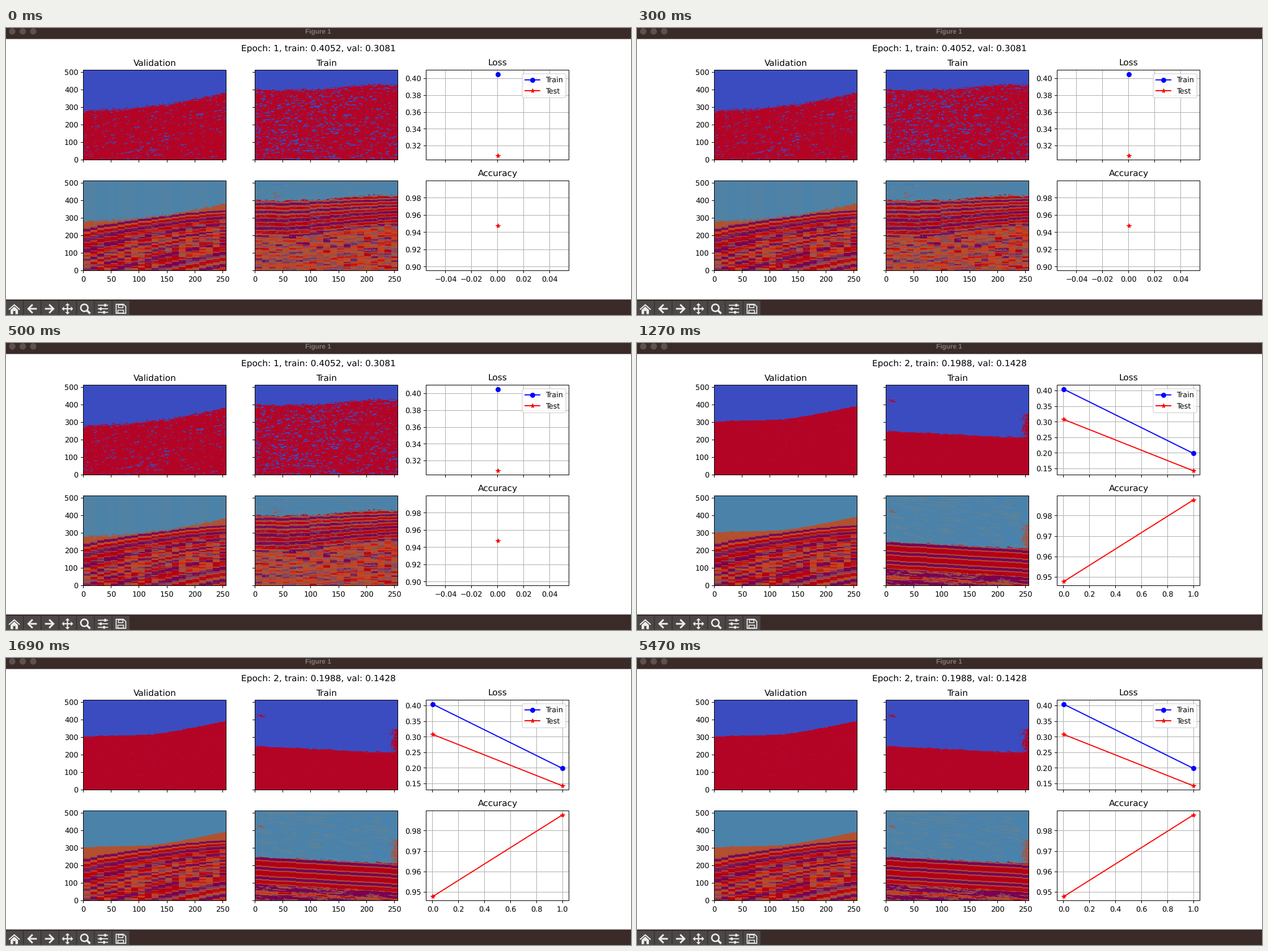
A matplotlib script for the animation above (7.99 s loop, 1103 by 508 pixels).

```python
import numpy as np
import matplotlib.pyplot as plt
from matplotlib.animation import FuncAnimation
from matplotlib.collections import LineCollection
from matplotlib.colors import LinearSegmentedColormap
from matplotlib.patches import Circle, FancyBboxPatch, Polygon, Rectangle

plt.rcParams["text.hinting"] = "none"
plt.rcParams["font.family"] = "DejaVu Sans"
plt.rcParams["path.snap"] = False

STAGE_W, STAGE_H, DPI = 1103, 508, 64
PT = 72 / DPI                      # points per pixel
STEP, FRAMES, SWITCH = 34, 235, 640
W, H = 252, 159                    # size of each panel
COLS, ROWS = (136.5, 439.5, 741.5), (74.5, 270.5)
SMALL, LARGE = 12.82, 15.38
BLUE, RED, SKY = np.array([[59, 76, 192], [180, 4, 38], [75, 130, 170]])
SEISMIC = LinearSegmentedColormap.from_list(
    "seismic_tint", ["#7a0050", "#86405c", "#b25230", "#d23a18", "#b20016"])

fig = plt.figure(figsize=(STAGE_W / DPI, STAGE_H / DPI), dpi=DPI, facecolor="white")
ax = fig.add_axes([0, 0, 1, 1])
ax.set_axis_off()


# ---------- drawing helpers (pixel coordinates, y down) ----------
def centre(p):
    return np.floor(p) + 0.5


def text(x, y, s, size=SMALL, ha="center", color="black", **kw):
    return ax.text(x, y, s, fontsize=size * PT, ha=ha, va="baseline",
                   color=color, zorder=6, **kw)


def segments(segs, color="black", z=4):
    lines = LineCollection([[(a, b), (c, d)] for a, b, c, d in segs],
                           colors=color, linewidths=1.02 * PT, zorder=z)
    return ax.add_collection(lines)


def line(xs, ys, color, width=1.92, z=3, **kw):
    return ax.plot(xs, ys, color=color, lw=width * PT, zorder=z, **kw)[0]


def series(xs, ys, color, marker, z=3):
    return line(xs, ys, color, z=z, marker=marker, ms=7.7 * PT, mew=1.28 * PT)


def rect(x, y, w, h, color, z=2):
    return ax.add_patch(Rectangle((x, y), w, h, fc=color, ec="none", zorder=z))


# ---------- synthetic sections ----------
X, Y = np.meshgrid(np.arange(W) + 0.5, np.arange(H) + 0.5)
T = X / W
BLOCK = 12
XB = (X // BLOCK + 0.5) * BLOCK


def ramp(v, lo, hi):
    return np.clip((v - lo) / (hi - lo), 0, 1)


def streaks(seed, run, dip=0.0, thick=1):
    """Unit noise stretched along x, falling by dip pixels per pixel."""
    rng = np.random.default_rng(seed)
    total = np.cumsum(rng.standard_normal((3 * H, W + run)), axis=1)
    field = (total[:, run:] - total[:, :-run]) / np.sqrt(run)
    rows = ((Y - dip * X) / thick + H).astype(int)
    return field[np.clip(rows, 0, 3 * H - 1), X.astype(int)]


def blocks(seed, height):
    grid = np.random.default_rng(seed).uniform(-1, 1, (H, W // BLOCK + 1))
    return grid[(Y / height).astype(int), (X // BLOCK).astype(int)]


def depth(v):
    return H - v * H / 512


def wave(cycles):
    return -np.cos(2 * np.pi * cycles)


def mix(img, where, color, amount):
    a = (np.asarray(where) * amount)[..., None]
    return img * (1 - a) + np.asarray(color) * a


def plain_sky():
    return np.broadcast_to(SKY, (H, W, 3))


def panels(layers, below, mask, sky):
    labels = np.where(mask[..., None], RED, BLUE)
    tint = SEISMIC((np.clip(layers, -1, 1) + 1) / 2)[..., :3] * 255
    seismic = np.where(below[..., None], tint, sky)
    return [labels, mix(seismic, below & ~mask, SKY, 0.4)]


def rising_layers():
    s = Y + XB * (0.175 + 0.0023 * (Y - 68)) + 1.2 * blocks(3, H)
    cycles = (s - 87) / 18.2 - 0.024 * np.maximum(s - 185, 0)
    value = np.clip(1.7 * wave(cycles) + 0.6 * wave(2.7 * cycles), -1, 1) * ramp(s, 80, 87)
    rough = ramp(s, 95, 150) * (1 - 0.9 * ramp(s, 185, 212))
    patchy = blocks(8, 9) > 0.1
    return value * (1 - 0.75 * rough * patchy) + rough * (0.25 + 0.4 * patchy) * blocks(4, 3.2)


def bent_layers():
    s = Y + ramp(XB, 70, 250) * np.clip(6 + 0.35 * (Y - 28), 5, 27) + 0.8 * blocks(13, H)
    gain = 1.1 + 0.9 * ramp(s, 60, 66) - 1.65 * ramp(s, 88, 104)
    value = np.clip(gain * wave((s - 41) / 14.3), -1, 1)
    rough = 0.2 + 0.8 * ramp(s, 86, 102)
    return value + rough * (0.05 + 0.6 * blocks(14, 3.1) + 0.35 * blocks(15, 7))


def falling_layers():
    s = Y - XB * 15 / W + 0.5 * blocks(23, H)
    low = ramp(s, 122, 130)
    value = np.clip(1.9 * wave((s - 83.5) / 17) + 0.6 - 2.1 * low, -1, 1)
    return value + low * 0.65 * np.clip(streaks(24, 26, 0.06, 2), -0.4, 1.4)


def epoch_one():
    below = Y + 1.7 * streaks(31, 5) > depth(284 + 104 * T ** 2)
    flecks = streaks(32, 5, -0.2, 1.6) + 0.6 * streaks(33, 40, -0.2, 2)
    bands = 0.5 + 0.5 * np.sin(X / 7) * np.sin(X / 23 + 1)
    sky = mix(plain_sky(), bands, (95, 130, 152), 0.4)
    valid = panels(rising_layers(), below, below & (flecks < 1.75), sky)

    rise = ramp(T, 0.35, 0.82)
    below = Y + 1.3 * streaks(41, 5) > depth(401 + 27 * rise ** 2 * (3 - 2 * rise))
    flecks = streaks(42, 5, -0.03, 1.6) + 0.4 * streaks(43, 30, -0.05, 2)
    faint = np.clip(streaks(44, 36) - 0.7, 0, 1)
    sky = mix(plain_sky(), faint, (112, 128, 132), 0.8)
    spots = (abs(X - 40) < 8) & (streaks(45, 7) > 0.6)
    sky = mix(sky, spots & (abs(Y - 9) < 5), (50, 120, 205), 0.8)
    sky = mix(sky, spots & (abs(Y - 25) < 5), (165, 85, 65), 0.8)
    return valid + panels(bent_layers(), below, below & (flecks < 0.95 + 0.35 * T), sky)


def epoch_two():
    top = depth(306 + 89 * T ** 2.3 + 3 * np.sin(3 * np.pi * T))
    below = Y + 0.35 * streaks(51, 6) > top
    valid = panels(rising_layers(), below, below & (streaks(52, 2) < 2.95), plain_sky())

    below = Y + 0.8 * streaks(61, 8) > depth(252 - 42 * T)
    noise = streaks(62, 3)
    fringe = (X > 242 + 4 * noise + 0.12 * abs(Y - 75)) & (Y > 50)
    specks = (abs(X - 10) < 8) & (abs(Y - 27) < 3.5) & (noise > 0.5)
    extra = (fringe | specks) & ~below
    faint = np.clip(streaks(64, 22, 0.11, 2) - 0.35, 0, 1)
    glow = np.clip(streaks(65, 14, 0.11, 2) - 0.8, 0, 1) * (X > 110)
    sky = mix(plain_sky(), faint, (108, 130, 140), 0.55)
    sky = mix(sky, glow, (58, 132, 200), 0.6)
    sky = mix(sky, extra, (172, 82, 60), 0.9)
    mask = extra | (below & (streaks(63, 2) < 3.1))
    return valid + panels(falling_layers(), below, mask, sky)


def show_sections(images):
    corners = [(c + 0.5, r + 0.5) for c in COLS[:2] for r in ROWS]
    return [ax.imshow(np.clip(img, 0, 255).astype(np.uint8), aspect="auto",
                      extent=(x, x + W, y + H, y), interpolation="nearest", zorder=1)
            for img, (x, y) in zip(images, corners)]


# ---------- charts ----------
TRAIN, TEST, ACC = (0.4052, 0.1988), (0.3081, 0.1428), (0.9478, 0.9878)


def padded(lo, hi):
    m = 0.05 * (hi - lo)
    return lo - m, hi + m


def ticks(lim, step):
    return np.arange(np.ceil(lim[0] / step), np.floor(lim[1] / step) + 1).astype(int) * step


def chart(row, xlim, ylim, xstep, ystep, curves):
    left, top = COLS[2], ROWS[row]
    bottom = top + H

    def px(v):
        return left + (np.asarray(v) - xlim[0]) / (xlim[1] - xlim[0]) * W

    def py(v):
        return bottom - (np.asarray(v) - ylim[0]) / (ylim[1] - ylim[0]) * H

    xticks, yticks = ticks(xlim, xstep), ticks(ylim, ystep)
    tx, ty = centre(px(xticks)), centre(py(yticks))
    out = [segments([(x, top, x, bottom) for x in tx]
                    + [(left, y, left + W, y) for y in ty], "#b0b0b0", z=1),
           segments([(x, bottom, x, bottom + 4.5) for x in tx]
                    + [(left - 4.5, y, left, y) for y in ty])]
    out += [text(left - 9, y + 4.65, f"{v:.2f}", ha="right") for v, y in zip(yticks, py(yticks))]
    if row == 1:
        places = 2 if xstep < 0.1 else 1
        out += [text(x, bottom + 19.1, f"{v:.{places}f}".replace("-", "\u2212"))
                for v, x in zip(xticks, px(xticks))]
    return out + [series(px(range(len(ys))), py(ys), color, marker)
                  for ys, color, marker in curves]


def charts(n, xstep, loss_step, acc_step):
    train, test, acc = TRAIN[:n], TEST[:n], ACC[:n]
    xlim = padded(0, 1) if n > 1 else padded(-0.05, 0.05)
    acc_lim = padded(*acc) if n > 1 else padded(0.95 * acc[0], 1.05 * acc[0])
    head = f"Epoch: {n}, train: {train[-1]:.4f}, val: {test[-1]:.4f}"
    return (chart(0, xlim, padded(min(test), max(train)), xstep, loss_step,
                  [(train, "blue", "o"), (test, "red", "*")])
            + chart(1, xlim, acc_lim, xstep, acc_step, [(acc, "red", "*")])
            + [text(551.5, 40.5, head, LARGE)])


# ---------- fixed parts ----------
def boxes():
    for c, left in enumerate(COLS):
        for top in ROWS:
            bottom = top + H
            ax.add_patch(Rectangle((left, top), W, H, fc="none", ec="black",
                                   lw=1.02 * PT, zorder=4))
            if c == 2:
                continue
            for u in range(0, 251, 50):
                x = left + u * W / 256
                segments([(centre(x), bottom, centre(x), bottom + 4.5)])
                if top == ROWS[1]:
                    text(x, bottom + 19.1, str(u))
            for v in range(0, 501, 100):
                y = top + depth(v)
                segments([(left - 4.5, centre(y), left, centre(y))])
                if c == 0:
                    text(left - 9, y + 4.65, str(v), ha="right")
    for left, name in zip(COLS, ("Validation", "Train", "Loss")):
        text(left + W / 2, 66.8, name, LARGE)
    text(COLS[2] + W / 2, 262.8, "Accuracy", LARGE)


def legend():
    ax.add_patch(FancyBboxPatch((911, 81), 77, 42.5, boxstyle="round,pad=0,rounding_size=2.6",
                                fc=(1, 1, 1, 0.8), ec=(0.8, 0.8, 0.8, 0.8),
                                lw=1.28 * PT, zorder=5))
    for y, name, color, marker in ((91.8, "Train", "blue", "o"), (111, "Test", "red", "*")):
        line([916, 942], [y, y], color, z=6)
        series([929], [y], color, marker, z=6)
        text(952, y + 4.6, name, ha="left")


def toolbar():
    ink = "#eeecec"
    mid = [14.6 + 31.3 * i for i in range(7)]
    cy = 497

    def stroke(points, width=2):
        xs, ys = zip(*points)
        line(xs, ys, ink, width, z=5, solid_capstyle="butt", solid_joinstyle="miter")

    def fill(points):
        ax.add_patch(Polygon(points, fc=ink, ec="none", zorder=5))

    for x in mid:
        rect(x - 14.6, 483, 30, 25, "#4c4848")

    x = mid[0]                     # home
    stroke([(x - 9.5, cy + 1.5), (x, cy - 7), (x + 9.5, cy + 1.5)])
    fill([(x - 6.5, cy + 2), (x, cy - 4), (x + 6.5, cy + 2)])
    for side in (-6.5, 2):
        rect(x + side, cy + 2, 4.5, 7.5, ink, 5)
    rect(x - 2, cy + 2, 4, 2, ink, 5)

    for x, d in ((mid[1], 1), (mid[2], -1)):      # back and forward
        stroke([(x - 7 * d, cy), (x + 8.5 * d, cy)], 3)
        stroke([(x + d, cy - 7.5), (x - 6.5 * d, cy), (x + d, cy + 7.5)], 3)

    x = mid[3]                     # pan
    for dx, dy in ((1, 0), (-1, 0), (0, 1), (0, -1)):
        stroke([(x, cy), (x + 7 * dx, cy + 7 * dy)], 2.2)
        fill([(x + 10 * dx, cy + 10 * dy),
              (x + 6 * dx + 4 * dy, cy + 6 * dy + 4 * dx),
              (x + 6 * dx - 4 * dy, cy + 6 * dy - 4 * dx)])

    x = mid[4]                     # zoom
    ax.add_patch(Circle((x - 1.5, cy - 1.7), 6.3, fc="none", ec=ink, lw=2.6 * PT, zorder=5))
    stroke([(x + 2.8, cy + 2.6), (x + 8.7, cy + 8.5)], 3.6)

    x = mid[5]                     # sliders
    for row, knob in ((-1, 4), (0, -4), (1, 2)):
        y = cy + 6.3 * row
        stroke([(x - 9, y), (x + 9, y)], 1.8)
        rect(x + knob - 1.8, y - 2.4, 3.6, 4.8, ink, 5)

    x = mid[6]                     # save
    ax.add_patch(Polygon([(x - 8, cy - 8), (x + 5, cy - 8), (x + 9, cy - 4), (x + 9, cy + 8),
                          (x - 8, cy + 8)], fc="none", ec=ink, lw=1.8 * PT, zorder=5))
    for y, w in ((cy - 7, 8), (cy + 2.5, 10)):
        ax.add_patch(Rectangle((x - w / 2, y), w, 5, fc="none", ec=ink, lw=1.6 * PT, zorder=5))


def window():
    for y, h in ((0, 19.5), (480.5, 27.5)):
        rect(0, y, STAGE_W, h, "#3a2b29")
    for i in range(3):
        ax.add_patch(Circle((11 + 18.5 * i, 6), 5.7, fc="#5d504e", ec="none", zorder=3))
    text(551, 10, "Figure 1", 11.8, color="#857977", family="Liberation Sans", weight="bold")


window()
toolbar()
boxes()
legend()
epochs = [show_sections(epoch_one()) + charts(1, 0.02, 0.02, 0.02),
          show_sections(epoch_two()) + charts(2, 0.2, 0.05, 0.01)]
ax.set_xlim(0, STAGE_W)
ax.set_ylim(STAGE_H, 0)


def update(i):
    now = int((i + 1) * STEP > SWITCH)
    for k, group in enumerate(epochs):
        for artist in group:
            artist.set_visible(k == now)
    return []


anim = FuncAnimation(fig, update, frames=FRAMES, interval=STEP, repeat=True,
                     repeat_delay=0, blit=False, cache_frame_data=False)
plt.show()
```
